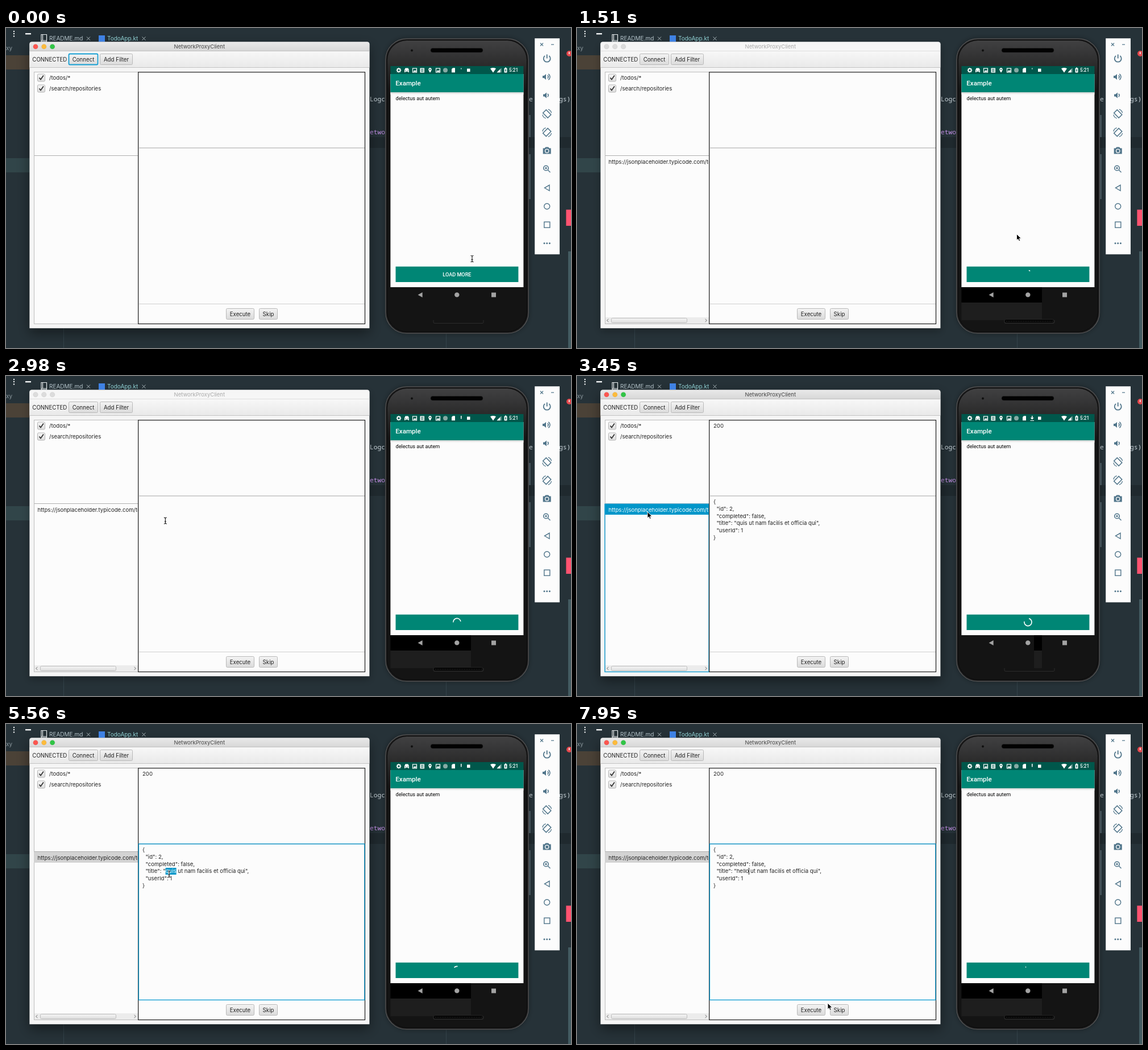
These frames come from a looping animation (994 px wide and 563 px high, 8 s). An HTML page with a canvas:

```html
<!DOCTYPE html>
<html lang="en">
<head>
<meta charset="utf-8">
<title>Network proxy demo</title>
<style>
html, body { margin: 0; width: 100%; height: 100%; overflow: hidden; background: #263238; }
canvas { display: block; width: 994px; height: 563px; }
</style>
</head>
<body>
<canvas id="stage" width="994" height="563"></canvas>
<script>
const c = document.getElementById('stage').getContext('2d');
const LOOP = 8000, TICK = 150;
const UI = 'Inter, "Open Sans", sans-serif';
const DROID = 'Roboto, sans-serif';
const MONO = '"Noto Sans Mono", monospace';
const CYAN = '#169fd3', TEAL = '#008675', STEEL = '#50758a';

function box(x, y, w, h, fill) {
  c.fillStyle = fill;
  c.fillRect(x, y, w, h);
}
function frame(x, y, w, h, color, width = 1) {
  c.strokeStyle = color;
  c.lineWidth = width;
  c.strokeRect(x, y, w, h);
}
function paint(fill, stroke, width) {
  if (fill) { c.fillStyle = fill; c.fill(); }
  if (stroke) { c.strokeStyle = stroke; c.lineWidth = width; c.stroke(); }
}
function round(x, y, w, h, r, fill, stroke, width = 1) {
  c.beginPath();
  c.roundRect(x, y, w, h, r);
  paint(fill, stroke, width);
}
function disc(x, y, r, fill, stroke, width = 1) {
  c.beginPath();
  c.arc(x, y, r, 0, 7);
  paint(fill, stroke, width);
}
function path(d, fill, stroke, width = 1, x = 0, y = 0) {
  const p = new Path2D(d);
  c.save();
  c.translate(x, y);
  if (fill) { c.fillStyle = fill; c.fill(p); }
  if (stroke) { c.strokeStyle = stroke; c.lineWidth = width; c.stroke(p); }
  c.restore();
}
function text(s, x, y, size, color, family = UI, weight = 400) {
  c.font = `${weight} ${size}px ${family}`;
  c.fillStyle = color;
  c.fillText(s, x, y);
  return c.measureText(s).width;
}
function centered(...args) {
  c.textAlign = 'center';
  text(...args);
  c.textAlign = 'left';
}
function fade(y0, y1, from, to) {
  const g = c.createLinearGradient(0, y0, 0, y1);
  g.addColorStop(0, from);
  g.addColorStop(1, to);
  return g;
}
function bezier(x, x1, y1, x2, y2) {
  let lo = 0, hi = 1;
  const at = (b, p, q) => 3 * p * b * (1 - b) ** 2 + 3 * q * b * b * (1 - b) + b ** 3;
  for (let i = 0; i < 20; i++) {
    const mid = (lo + hi) / 2;
    if (at(mid, x1, x2) < x) lo = mid; else hi = mid;
  }
  return at(lo, y1, y2);
}

function editor() {
  box(0, 0, 994, 563, '#263238');
  box(0, 48, 42, 25, '#4b4237');
  box(0, 229, 42, 25, '#314549');
  text('xy', 0, 39, 10, '#8b989e');
  box(640, 192, 354, 19, '#1f292e');
  text('Logc', 640, 129, 11.2, '#ccd6dc', MONO);
  text('etwo', 640, 187, 11.2, '#c792ea', MONO);
  text('e', 920, 129, 11.2, '#ccd6dc', MONO);
  text('gs)', 973, 129, 11.2, '#ccd6dc', MONO);
  box(101, 528, 1, 35, '#34434a');
  box(774, 528, 1, 35, '#34434a');
  box(920, 153, 3, 39, '#4d5d65');
  box(920, 222, 3, 79, '#4d5d65');
  disc(991, 45, 5, '#e5484d');
  box(990, 42, 1.5, 4, '#fff');
  box(985.4, 319.6, 9, 28.4, '#ff5370');
  box(989, 393, 5, 170, '#435b61');
}

function tabs() {
  for (const y of [6, 10, 14.4]) disc(14, y, 1.2, '#f2f4f5');
  box(34, 9, 10, 2.4, '#f2f4f5');
  path('M62 11.5h9.5v10.5h-9.5zM64.5 11.5v10M62 22v2h9.5v-2', null, '#e4e9eb', 1.2);
  text('README.md', 76, 22.3, 10, '#b3c2c9');
  box(163, 13, 11, 11, '#3f82e4');
  text('TodoApp.kt', 178, 22.3, 10, '#8fd0d3');
  for (const x of [145, 242.5]) path('M-3 -3L3 3M3 -3L-3 3', null, '#a9b6bb', 1, x, 18.5);
}

function button(label, x, y, w, focused) {
  round(x + .5, y + .5, w - 1, 19, 2, fade(y, y + 20, '#f4f4f4', '#dadada'), '#b9b9b9');
  if (focused) round(x + .5, y + .5, w - 1, 19, 2, null, CYAN, 1.8);
  centered(label, x + w / 2, y + 13.5, 9.7, '#222');
}

function checkRow(label, y) {
  round(55.5, y - 6.5, 13, 13, 2, fade(y - 6, y + 7, '#f5f5f5', '#dcdcdc'), '#b5b5b5');
  path('M-3.5 0L-1 3L4 -4', null, '#333', 1.7, 62, y);
  text(label, 76, y + 3.5, 9.6, '#222');
}

function requests(n) {
  if (n < 9) return;
  const active = n >= 23 && n < 35;
  if (n >= 23) box(49, 225, 183, 19, active ? '#0096c9' : '#d3d3d3');
  c.save();
  c.beginPath();
  c.rect(50, 225, 181.5, 20);
  c.clip();
  text('https://jsonplaceholder.typicode.com/todos/2', 55.5, 238.5, 9.6, active ? '#fff' : '#222');
  c.restore();
  box(50, 509, 182, 11, '#ececec');
  round(60.5, 510.5, 133, 8, 2, fade(510, 519, '#f6f6f6', '#dedede'), '#bdbdbd');
  path('M55.5 512L52.5 514.5L55.5 517M225.5 512L228.5 514.5L225.5 517', null, '#777');
  if (active) frame(49, 225.3, 183, 295.2, CYAN, 1.4);
}

function response(n) {
  if (n >= 35) frame(233.4, 211, 397.4, 274.5, CYAN, 1.4);
  if (n < 23) return;
  const size = 9.6, ink = '#222', x = 240;
  const typed = [40, 42, 45, 47, 49].filter(k => n >= k).length;
  const word = typed ? 'hello'.slice(0, typed) : 'quis';
  text('200', x, 91, size, ink);
  const line = (s, row) => text(s, x, 224.5 + row * 12.6, size, ink);
  line('{', 0);
  line('  "id": 2,', 1);
  line('  "completed": false,', 2);
  const lead = x + line('  "title": "', 3);
  const picked = n >= 36 && !typed;
  const wide = c.measureText(word).width;
  if (picked) box(lead, 253, wide, 12, '#0096c9');
  text(word, lead, 262.3, size, picked ? '#fff' : ink);
  text(' ut nam facilis et officia qui",', lead + wide, 262.3, size, ink);
  line('  "userId": 1', 4);
  line('}', 5);
  if (typed) box(Math.round(lead + wide), 253, 1, 12, '#111');
}

function client(n) {
  const focused = n < 2 || n >= 23;
  const left = 41.4, top = 24.5, width = 598;
  c.save();
  c.shadowColor = focused ? 'rgba(0,0,0,.45)' : 'rgba(0,0,0,.3)';
  c.shadowBlur = focused ? 22 : 14;
  c.shadowOffsetY = focused ? 8 : 5;
  round(left, top, width, 503.8, [4, 4, 0, 0], '#f5f5f5');
  c.restore();
  tabs();
  round(left, top, width, 16.5, [4, 4, 0, 0], focused ? fade(24, 41, '#eaeaea', '#d6d6d6') : '#f6f6f6');
  box(left, 40, width, 1, focused ? '#bfbfbf' : '#dddddd');
  const lights = focused ? ['#fc5650', '#fdbb3c', '#31c546'] : ['#dcdcdc', '#dcdcdc', '#dcdcdc'];
  lights.forEach((col, i) => disc(52 + i * 14.8, 32.7, 4.3, col, 'rgba(0,0,0,.1)', .6));
  centered('NetworkProxyClient', 340.3, 36.3, 9.5, focused ? '#444' : '#aaa');

  box(left, 41, width, 28, fade(41, 69, '#f7f7f7', '#e9e9e9'));
  box(left, 69, width, 1, '#c4c4c4');
  text('CONNECTED', 46.3, 58.7, 9.7, '#222');
  button('Connect', 110, 45, 52, n < 2);
  button('Add Filter', 165, 45, 58);

  box(49, 77, 183, 444, '#fcfcfc');
  frame(49.5, 77.5, 183, 443, '#bdbdbd');
  box(50, 224, 182, 1, '#b0b0b0');
  checkRow('/todos/*', 87.5);
  checkRow('/search/repositories', 106.5);
  requests(n);

  box(233, 77, 399, 444, '#fcfcfc');
  box(234, 210.5, 397, 1, '#a5a5a5');
  box(234, 485, 397, 1, '#cfcfcf');
  frame(232.7, 77.7, 398.8, 442.8, '#1d1d1d', 1.2);
  button('Execute', 387, 493, 50);
  button('Skip', 445, 493, 33);
  response(n);
}

function picture(x) {
  frame(x - 3, 71, 7, 7, '#fff', 1.2);
  path('M-2 3L0 0L1.5 1.5L3 -1V3Z', '#fff', null, 1, x, 74);
}

function download(t) {
  const k = Math.floor(t % 1200 / 200);
  if (k < 2) return box(800, 70.5, 1.5, 2, '#cfe3df');
  box(800, 70, 1.5, k < 4 ? 5.5 : 4, '#fff');
  if (k < 4) return;
  path('M-3 0H3L0 3.5Z', '#fff', null, 1, 800.7, 73.2);
  if (k === 5) box(797.5, 78, 6.5, 1, '#fff');
}

function statusBar(t) {
  box(676.4, 67, 234, 14, '#00574b');
  disc(691, 74.3, 2.6, null, '#fff', 1.7);
  for (let i = 0; i < 8; i++) {
    const a = i * Math.PI / 4;
    disc(691 + Math.cos(a) * 3.7, 74.3 + Math.sin(a) * 3.7, .8, '#fff');
  }
  path('M-4 0L-2.5 -3.5H2.5L4 0V4H2.5V2.7H-2.5V4H-4Z', '#fff', null, 1, 705, 74);
  box(702.5, 74.5, 1.3, 1.2, '#00574b');
  box(706.5, 74.5, 1.3, 1.2, '#00574b');
  picture(718.5);
  box(728.5, 70.5, 7.5, 8, '#fff');
  for (const y of [72, 74, 76]) box(730, y, 4.5, .9, '#00574b');
  path('M0 4.5C-4 0 -3 -4 0 -4C3 -4 4 0 0 4.5Z', '#fff', null, 1, 746, 74);
  disc(746, 73, 1, '#00574b');
  picture(759.5);
  disc(773, 74.3, 4, '#86aaa4');
  path('M-3 -2L-1 -4H3V4H-3Z', '#fff', null, 1, 787, 74.3);
  download(t);
  box(811, 71.5, 5.5, 5.5, '#fff');
  path('M-5 -3.3Q0 -6 5 -3.3L0 4Z', '#fff', null, 1, 857, 74.6);
  path('M4 -4V4H-4Z', '#83aaa4', null, 1, 867.5, 74.3);
  path('M1.5 -1.5V4H-4Z', '#fff', null, 1, 867.5, 74.3);
  round(876.5, 70.5, 5, 8, 1, '#fff');
  box(878, 69.5, 2, 1.5, '#fff');
  box(878.3, 72.5, 1.4, 4, '#00574b');
  text('5:21', 885, 77.4, 8.2, '#fff', DROID, 500);
}

// Trimmed arc: the head runs ahead in the first half, the tail catches up in the second.
function spinner(t) {
  const p = (((t - 58) / 1333) % 1 + 1) % 1;
  const head = p < .5 ? .75 * bezier(p * 2, .4, 0, .2, 1) : .75;
  const tail = p < .5 ? 0 : .75 * bezier(p * 2 - 1, .4, 0, .2, 1);
  const base = p / 4 + (t * 720 / 4444 + 122) / 360 - .25;
  const turn = Math.PI * 2;
  c.beginPath();
  c.arc(793.4, 433, 6.6, turn * (base + tail), turn * (base + Math.max(head, tail + .03)));
  paint(null, '#fff', 1.6);
}

function phone(t, n) {
  c.save();
  c.shadowColor = 'rgba(0,0,0,.35)';
  c.shadowBlur = 8;
  round(667, 18, 253, 520, 38, '#1b1b1c');
  c.restore();
  round(667.8, 18.8, 251.4, 518.4, 37, null, '#5a5b5c', 1.2);
  round(670.5, 21.5, 246, 513, 35, fade(22, 110, '#414142', '#141414'), '#0a0a0a');
  round(747, 35.5, 92, 7.5, 3.7, '#020202', '#262626', .6);
  disc(714, 39.5, 2, '#0b0b0b', '#2c2c2c', .7);
  path('M752 514V517.5Q752 519.5 754 519.5H838Q840 519.5 840 517.5V514', null, '#333', .8);

  const left = n >= 9 && n < 23 || n >= 35 ? 676.4 : 804;
  if (n >= 9) {
    box(left, 456, 818 - left, 27, '#000');
    box(left, 483, 818 - left, 31, '#1e1e1e');
    if (left < 700) {
      round(752, 512.5, 87, 6.5, 3, '#050505', '#303030', .7);
      for (let x = 755; x < 837; x += 3) box(x, 515, 1, 2, '#242424');
    }
  }
  path('M4 -4.5V4.5L-4 0Z', '#a3a3a3', null, 1, 728.6, 469.5);
  disc(793.3, 469.4, 4.2, '#a3a3a3');
  box(854, 465.5, 8, 8, '#a3a3a3');

  box(676.4, 81, 234, 375, '#fcfcfc');
  box(676.4, 113, 234, 4, fade(113, 117, '#cfd2d1', '#fcfcfc'));
  box(676.4, 81, 234, 32, TEAL);
  statusBar(t);
  text('Example', 685.3, 101.2, 11.6, '#fff', DROID, 500);
  text('delectus aut autem', 685.6, 127.3, 9.1, '#000', DROID);
  box(685.5, 419.7, 215.9, 27.3, TEAL);
  if (n >= 6) spinner(t);
  else centered('LOAD MORE', 793.4, 436.7, 9.1, '#fff', DROID, 500);
}

function speaker(y, waves) {
  path('M-5 -2H-2.5L1 -5V5L-2.5 2H-5Z', STEEL, null, 1, 951 - waves, y);
  for (let i = 0; i < waves; i++) {
    c.beginPath();
    c.arc(951, y, 3 + i * 3, -1, 1);
    paint(null, STEEL, 1.5);
  }
}

function rotator(y, flip) {
  c.save();
  c.translate(951.7, y);
  c.scale(flip, 1);
  c.save();
  c.rotate(-Math.PI / 4);
  frame(-4, -6, 8, 12, STEEL, 1.5);
  c.restore();
  path('M-7.8 1.5A8 8 0 0 0 -2 7.8M7.8 -1.5A8 8 0 0 0 2 -7.8', null, STEEL, 1.3);
  c.restore();
}

function sidebar() {
  box(930.2, 18.2, 43.8, 380, '#fcfcfc');
  path('M-2.5 -2.5L2.5 2.5M2.5 -2.5L-2.5 2.5', null, STEEL, 1.2, 942.5, 29);
  box(959, 28.5, 5, 1.2, STEEL);
  path('M-3.7 -4.5A6 6 0 1 0 3.7 -4.5M0 -7V0', null, STEEL, 1.8, 951.7, 53.5);
  speaker(86, 2);
  speaker(118.5, 1);
  rotator(151, 1);
  rotator(183.5, -1);
  path('M-7 -4H-4L-2.5 -6H2.5L4 -4H7V6H-7Z', STEEL, null, 1, 951.7, 215.5);
  disc(951.7, 216.3, 3.2, STEEL, '#fcfcfc', 1.3);
  disc(950, 246.5, 4.3, null, STEEL, 1.6);
  path('M3 3L7.5 7.5M-2 0H2M0 -2V2', null, STEEL, 1.4, 950, 246.5);
  path('M4 -5V5L-4.5 0Z', null, STEEL, 1.4, 952, 281.3);
  disc(951.7, 313.7, 5, null, STEEL, 1.4);
  frame(946.8, 341.2, 10, 10, STEEL, 1.4);
  for (const x of [947, 951.7, 956.4]) disc(x, 378.8, 1.5, STEEL);
}

const ROUTE = [
  [0, 820, 406], [4, 820, 426], [6, 820, 426], [14, 727, 299], [16, 727, 299],
  [22, 124, 239], [25, 124, 239], [33, 287, 264], [47, 287, 264], [51, 345, 428], [53, 441, 491]
];

function pointer(n) {
  const i = Math.max(1, ROUTE.findIndex(r => r[0] >= n));
  const [n0, x0, y0] = ROUTE[i - 1], [n1, x1, y1] = ROUTE[i];
  const u = (n - n0) / (n1 - n0), e = u * u * (3 - 2 * u);
  const x = x0 + (x1 - x0) * e, y = y0 + (y1 - y0) * e;
  const overText = x > 233 && x < 631 && y < 485;
  if (n < 2 || overText) {
    const beam = 'M-2.5 -5.5Q0 -5.5 0 -4Q0 -5.5 2.5 -5.5M0 -4V4M-2.5 5.5Q0 5.5 0 4Q0 5.5 2.5 5.5M-1.5 1.5H1.5';
    path(beam, null, 'rgba(255,255,255,.8)', 2.4, x, y);
    path(beam, null, '#111', 1.1, x, y);
  } else {
    path('M0 0V11L2.5 8.7L4.2 12.5L6.2 11.6L4.5 8H8Z', '#000', '#fff', .9, x, y);
  }
}

function draw() {
  const t = (performance.now() - start) % LOOP;
  const n = Math.min(53, Math.floor((t + 25) / TICK));
  editor();
  client(n);
  phone(n * TICK, n);
  sidebar();
  pointer(n);
  requestAnimationFrame(draw);
}

const start = performance.now();
draw();
</script>
</body>
</html>
```
